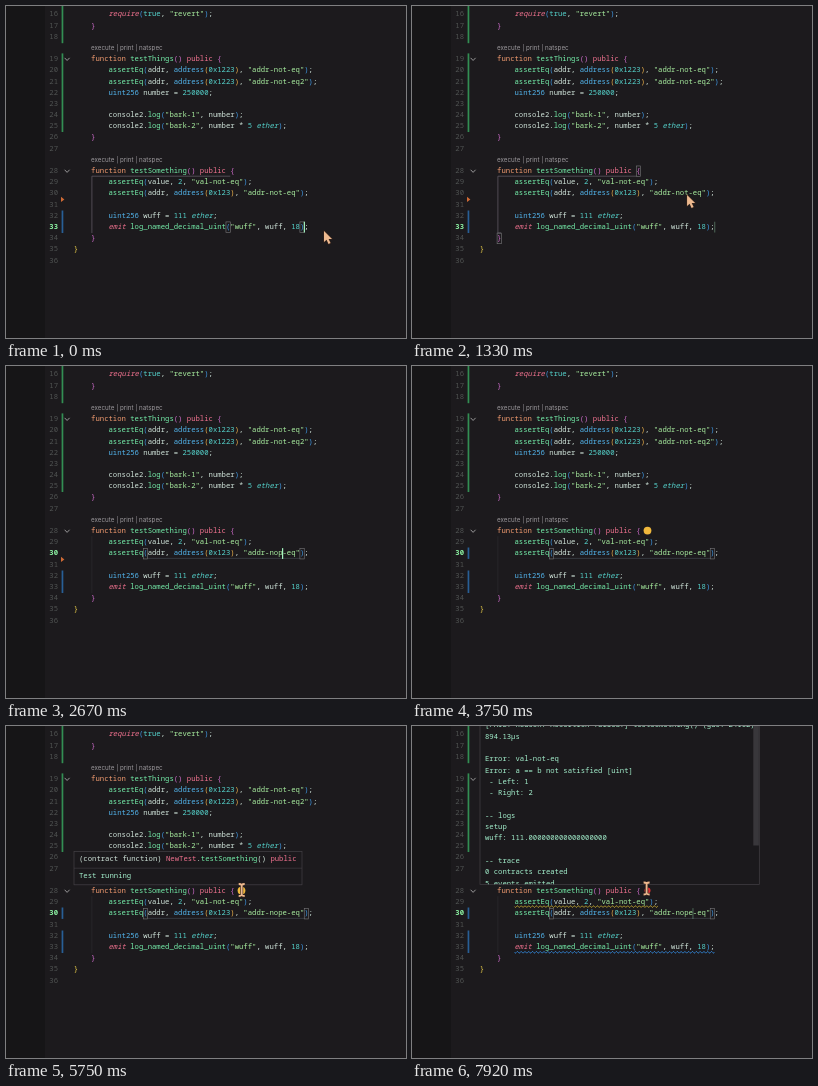
Animation, 400 px wide and 332 px high, one loop 8 s. Source, as an HTML page with a canvas:

```html
<!DOCTYPE html>
<html lang="en">
<head>
<meta charset="utf-8">
<title>Editor test run</title>
<style>
  html, body { margin: 0; width: 100%; height: 100%; overflow: hidden; background: #1c1a1d; }
  canvas { display: block; width: 400px; height: 332px; }
</style>
</head>
<body>
<canvas></canvas>
<script>
const W = 400, H = 332, LOOP = 8000;
const CHAR = 4.35, ROW = 11.19, TOP = 8.3, LEFT = 67.7;
const MONO = '500 7.25px "Noto Sans Mono", monospace';
const BOLD = MONO.replace('500', 'bold');
const SANS = '6.25px Inter, sans-serif';
const MINT = '#a3efcc', GREEN = '#74eeaa', BLUE = '#52b4ec', CYAN = '#55d3cc', PINK = '#f0728f',
  ORANGE = '#f39c70', STRING = '#a9efa0', PLAIN = '#d0e4da';
const BRACKETS = ['#ecd04a', '#cf6ccb', '#3f96e0', '#ecb04a'];
const PEACH = '#edb98f', ADDED = '#338e53', MODIFIED = '#285f96';

const canvas = document.querySelector('canvas');
const ctx = canvas.getContext('2d');
const ratio = window.devicePixelRatio || 1;
canvas.width = W * ratio;
canvas.height = H * ratio;

// Event times in ms
const SEMICOLON = 500, CLICK = 1600, ERASE = 2330, TYPE_P = 2580, TYPE_E = 2830,
  SAVE = 3500, TIP_OPEN = 5520, TIP_CLOSE = 6080, FAILED = 6350, REPORT = 7330;

const LENS = 'execute | print | natspec';
// One entry per visual row: [line number, indent, text]
const codeRows = word => [
  [15, 2, 'value = 1;'],
  [16, 2, 'require(true, "revert");'],
  [17, 1, '}'],
  [18, 0, ''],
  [0, 1, LENS],
  [19, 1, 'function testThings() public {'],
  [20, 2, 'assertEq(addr, address(0x1223), "addr-not-eq");'],
  [21, 2, 'assertEq(addr, address(0x1223), "addr-not-eq2");'],
  [22, 2, 'uint256 number = 250000;'],
  [23, 0, ''],
  [24, 2, 'console2.log("bark-1", number);'],
  [25, 2, 'console2.log("bark-2", number * 5 ether);'],
  [26, 1, '}'],
  [27, 0, ''],
  [0, 1, LENS],
  [28, 1, 'function testSomething() public {'],
  [29, 2, 'assertEq(value, 2, "val-not-eq");'],
  [30, 2, `assertEq(addr, address(0x123), "addr-${word}-eq");`],
  [31, 0, ''],
  [32, 2, 'uint256 wuff = 111 ether;'],
  [33, 2, 'emit log_named_decimal_uint("wuff", wuff, 18);'],
  [34, 1, '}'],
  [35, 0, '}'],
  [36, 0, ''],
];

const REPORT_TEXT = `[FAIL. Reason: Assertion failed.] testSomething() (gas: 24162)
894.13µs

Error: val-not-eq
Error: a == b not satisfied [uint]
 - Left: 1
 - Right: 2

-- logs
setup
wuff: 111.000000000000000000

-- trace
0 contracts created
5 events emitted`.split('\n');

const lineY = n => TOP + ROW * (n - 16 + (n >= 19) + (n >= 28));
const colX = (indent, col) => LEFT + (indent * 4 + col) * CHAR;

function text(str, x, y, color, font = MONO) {
  ctx.font = font;
  ctx.fillStyle = color;
  ctx.fillText(str, x, y);
}

function rect(x, y, w, h, color) {
  ctx.fillStyle = color;
  ctx.fillRect(x, y, w, h);
}

function stroke(points, color, width = 0.6) {
  ctx.beginPath();
  points.forEach(([x, y]) => ctx.lineTo(x, y));
  ctx.strokeStyle = color;
  ctx.lineWidth = width;
  ctx.stroke();
}

function tokenStyle(token, isCall) {
  if (token[0] === '"') return [STRING];
  if (/^(emit|require)$/.test(token)) return [PINK, 'italic '];
  if (token === 'function') return [ORANGE];
  if (token === 'public') return [PINK];
  if (token === 'ether') return [CYAN, 'italic '];
  if (/^(uint256|address)$/.test(token)) return [BLUE];
  if (/^(\d|true$)/.test(token)) return [CYAN];
  return [isCall ? GREEN : PLAIN];
}

function codeLine(str, indent, y) {
  let depth = indent;
  for (const { 0: token, index } of str.matchAll(/"[^"]*"|\w+|[^\s\w]/g)) {
    let [color, slant = ''] = tokenStyle(token, str[index + token.length] === '(');
    if (token === '(') color = BRACKETS[depth++];
    if (token === ')') color = BRACKETS[--depth];
    if (token === '{' || token === '}') color = BRACKETS[indent];
    text(token, colX(indent, index), y, color, slant + MONO);
  }
}

function bracketBox(indent, col, line) {
  ctx.strokeStyle = '#78787a';
  ctx.lineWidth = 0.6;
  ctx.strokeRect(colX(indent, col), lineY(line) - 5, CHAR, 10.6);
}

function gutter(t, activeLine) {
  rect(0, 0, 39, H, '#161517');
  const bar = (y, h, color) => rect(55.6, y, 1.7, h, color);
  bar(0, 37.2, ADDED);
  bar(47.4, 78.6, ADDED);
  bar(204.5, 22.5, MODIFIED);
  if (t >= SAVE) {
    bar(181.5, 11.4, MODIFIED);
  } else {
    ctx.fillStyle = '#cf6a35';
    ctx.fill(new Path2D('M55 190.8L58.4 193.4L55 196Z'));
  }
  for (const n of [19, 28]) {
    const y = lineY(n);
    stroke([[58.6, y - 1.2], [61.1, y + 1.4], [63.6, y - 1.2]], '#b8b8b8', 0.8);
  }
  ctx.textAlign = 'right';
  for (let n = 15; n <= 36; n++) {
    const active = n === activeLine;
    text(n, 52, lineY(n), active ? '#8df5a4' : '#505352', active ? BOLD : MONO);
  }
  ctx.textAlign = 'left';
}

function brackets(t, word) {
  if (t < CLICK) {
    const bottom = t < SEMICOLON ? 85.9 : 89;
    stroke([[colX(1, 32), 170.2], [85.9, 170.2], [85.9, 227], [bottom, 227]], '#67606a', 0.7);
    if (t < SEMICOLON) {
      bracketBox(2, 27, 33);
      bracketBox(2, 44, 33);
    } else {
      bracketBox(1, 32, 28);
      bracketBox(1, 0, 34);
    }
  } else {
    const close = 41 + word.length;
    stroke([[colX(2, 9), 192.4], [colX(2, close), 192.4]], '#4d5560', 0.5);
    stroke([[85.9, 170.2], [85.9, 227]], '#353337', 0.5);
    bracketBox(2, 8, 30);
    bracketBox(2, close, 30);
  }
}

function caret(t, word) {
  const typing = t >= CLICK && t < SAVE;
  if (!typing && (t + 100) % 1000 >= 500) return;
  const col = t < SEMICOLON ? 45 : t < CLICK ? 46 : 37 + word.length;
  const y = lineY(t < CLICK ? 33 : 30);
  ctx.globalAlpha = t >= SEMICOLON && t < CLICK || t > 7900 ? 0.3 : 1;
  rect(colX(2, col) - 0.5, y - 5.2, 1.2, 10.8, '#a5f5c0');
  ctx.globalAlpha = 1;
}

function squiggle(x1, x2, y, color) {
  const points = [];
  for (let x = x1; x <= x2; x += 0.5) points.push([x, y + 0.8 * Math.sin((x - x1) * 1.65)]);
  stroke(points, color, 0.8);
}

function testStatus(t) {
  if (t < SAVE) return;
  const failed = t >= FAILED;
  ctx.beginPath();
  ctx.arc(235.5, 164.6, failed ? 3 : 3.9, 0, Math.PI * 2);
  ctx.fillStyle = failed ? '#dc3437' : '#f0b83c';
  ctx.fill();
  if (failed) {
    rect(234, 164.6, 3, 0.8, '#7d1c20');
    squiggle(colX(2, 0), colX(2, 33), 180.6, '#cdb032');
    squiggle(colX(2, 0), colX(2, 46), 226.3, '#3794ee');
  }
}

function panel(x, y, w, h) {
  rect(x, y, w, h, '#1b191c');
  ctx.strokeStyle = '#444146';
  ctx.lineWidth = 0.7;
  ctx.strokeRect(x, y, w, h);
}

function tooltip() {
  panel(68, 125.6, 228, 33.2);
  stroke([[68, 142.2], [296, 142.2]], '#444146');
  let x = 73;
  for (const [part, color] of [['(contract function) ', PLAIN], ['NewTest', PINK], ['.', PLAIN],
    ['testSomething', GREEN], ['() ', PLAIN], ['public', PINK]]) {
    text(part, x, 133.4, color);
    x += part.length * CHAR;
  }
  text('Test running', 73, 150.2, MINT);
}

function report() {
  panel(68, -10, 279.3, 168.6);
  ctx.save();
  ctx.beginPath();
  ctx.rect(68, 0, 273, 158.3);
  ctx.clip();
  REPORT_TEXT.forEach((line, i) => text(line, 73, -0.8 + i * 11.32, MINT));
  ctx.restore();
  rect(341.3, 0, 5.6, 119.5, '#39373b');
}

// [time, x, y]
const POINTER = [
  [0, 318, 225], [250, 318, 225], [1250, 275, 189], [1750, 276, 188], [2200, 322, 192],
  [4050, 322, 192], [4200, 327, 190], [4750, 262, 186], [5150, 262, 186], [5450, 235.7, 164],
  [6020, 235.7, 164], [6280, 310, 172], [6480, 308, 172], [6830, 249, 167.5], [7120, 235, 163],
  [8000, 234.6, 162.5],
];

function pointerAt(t) {
  const i = POINTER.findIndex(p => p[0] > t);
  const [t1, x1, y1] = POINTER[i - 1], [t2, x2, y2] = POINTER[i];
  const u = (t - t1) / (t2 - t1), e = u * u * (3 - 2 * u);
  return [x1 + (x2 - x1) * e, y1 + (y2 - y1) * e];
}

const ARROW = new Path2D('M0 0V11L2.6 8.7L4.5 13L6.5 12.1L4.6 8H8Z');
const IBEAM = new Path2D('M-3 -6Q-.8 -6 0 -5Q.8 -6 3 -6M0 -5V5M-3 6Q-.8 6 0 5Q.8 6 3 6');

function pointer(t) {
  if (t >= ERASE && t < 4050) return;
  const [x, y] = pointerAt(t);
  ctx.save();
  ctx.translate(x, y);
  ctx.lineJoin = 'round';
  if (t < CLICK) {
    ctx.strokeStyle = '#33231c';
    ctx.lineWidth = 1.4;
    ctx.stroke(ARROW);
    ctx.fillStyle = PEACH;
    ctx.fill(ARROW);
  } else {
    for (const [color, width] of [['#33231c', 3], [PEACH, 1.8]]) {
      ctx.strokeStyle = color;
      ctx.lineWidth = width;
      ctx.stroke(IBEAM);
    }
  }
  ctx.restore();
}

function draw(t) {
  const word = t < ERASE ? 'not' : t < TYPE_P ? 'no' : t < TYPE_E ? 'nop' : 'nope';
  ctx.setTransform(ratio, 0, 0, ratio, 0, 0);
  ctx.textBaseline = 'middle';
  rect(0, 0, W, H, '#1c1a1d');
  gutter(t, t < CLICK ? 33 : 30);
  brackets(t, word);
  codeRows(word).forEach(([n, indent, str], i) => {
    const y = TOP + (i - 1) * ROW;
    if (n) codeLine(str, indent, y);
    else text(str, colX(indent, 0), y + 0.7, '#9c999d', SANS);
  });
  testStatus(t);
  caret(t, word);
  if (t >= TIP_OPEN && t < TIP_CLOSE) tooltip();
  if (t >= REPORT) report();
  pointer(t);
}

const start = performance.now();
function frame() {
  draw((performance.now() - start) % LOOP);
  requestAnimationFrame(frame);
}
frame();
</script>
</body>
</html>
```
